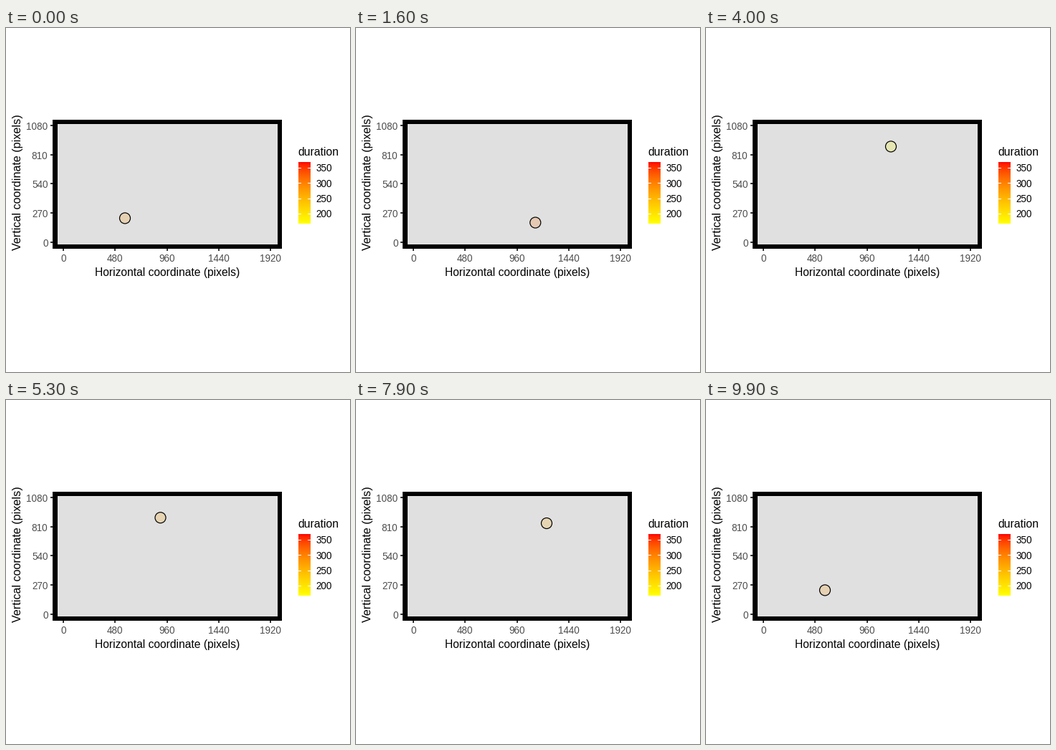
Write a matplotlib script that moves like this. It is 480 by 480 pixels and loops after 10000 ms.

```python
import numpy as np
import matplotlib.pyplot as plt
from matplotlib.animation import FuncAnimation
from matplotlib.patches import Circle, Rectangle

SIZE, DPI = 480, 100
PX = 72 / DPI  # points per pixel
FRAMES, INTERVAL = 100, 100
GREY = 0.878

plt.rcParams["font.family"] = "Liberation Sans"
fig = plt.figure(figsize=(SIZE / DPI, SIZE / DPI), dpi=DPI, facecolor="white")
ax = fig.add_axes([0, 0, 1, 1])
ax.axis("off")


def box(left, top, right, bottom, color, z=1):
    ax.add_patch(Rectangle((left, top), right - left, bottom - top, facecolor=color,
                           edgecolor="none", antialiased=False, zorder=z))


def label(x, y, text, size, color="black", ha="left", **kw):
    ax.text(x, y, text, fontsize=size * PX, color=color, ha=ha, va="baseline", **kw)


def heat(t):
    """Yellow at 0 to red at 1, evenly spaced to the eye."""
    green = (1 - np.asarray(t, dtype=float)) ** 0.63
    return np.stack([np.ones_like(green), green, np.zeros_like(green)], axis=-1)


# Panel and axes
box(65, 128, 385, 308, "black")
box(72, 134, 379, 302, str(GREY))
for i in range(5):
    x, y = 80 + 72.3 * i, 299 - 40.8 * i
    box(round(x) - 1, 308, round(x) + 1, 311, "#333333")
    box(62, round(y) - 1, 65, round(y) + 1, "#333333")
    label(x, 326, str(480 * i), 13.5, "#4d4d4d", "center")
    label(58.5, y + 6, str(270 * i), 13.5, "#4d4d4d", "right")
label(225, 346, "Horizontal coordinate (pixels)", 15.65, ha="center")
label(21.5, 215.5, "Vertical coordinate (pixels)", 16.1, ha="center",
      rotation=90, rotation_mode="anchor")

# Colour legend
label(407.5, 178, "duration", 15.7)
ax.imshow(heat(np.linspace(1, 0, 86))[:, None, :], extent=(408, 425, 273, 187),
          aspect="auto", interpolation="nearest", zorder=1)
for i in range(4):
    y = 195 + 21.5 * i
    for left in (408, 421):
        box(left, int(y), left + 4, int(y) + 1, "white", 2)
    label(432.5, y + 5, str(350 - 50 * i), 13.5)
ax.set(xlim=(0, SIZE), ylim=(SIZE, 0))

# Fixations as x, y, heat; the path closes on its first stop
STOPS = np.array([(166, 265.4, 0.57), (284, 274, 0.81), (258, 165.4, 0),
                  (173, 163, 1), (266, 172, 0.47)])
ARRIVE = np.array([-1, 20, 40, 59, 79, 99])
REST = 7

keys = np.stack([ARRIVE, ARRIVE + REST], axis=1).ravel()
path = np.repeat(np.vstack([STOPS, STOPS[:1]]), 2, axis=0)
dot = ax.add_patch(Circle((0, 0), 7.5, edgecolor="black", linewidth=1.2 * PX, zorder=3))


def update(frame):
    x, y, t = (np.interp(frame, keys, column) for column in path.T)
    dot.center = x, y
    dot.set_facecolor(0.8 * GREY + 0.2 * heat(t))
    return (dot,)


anim = FuncAnimation(fig, update, frames=FRAMES, interval=INTERVAL, repeat=True,
                     repeat_delay=0)
plt.show()
```
